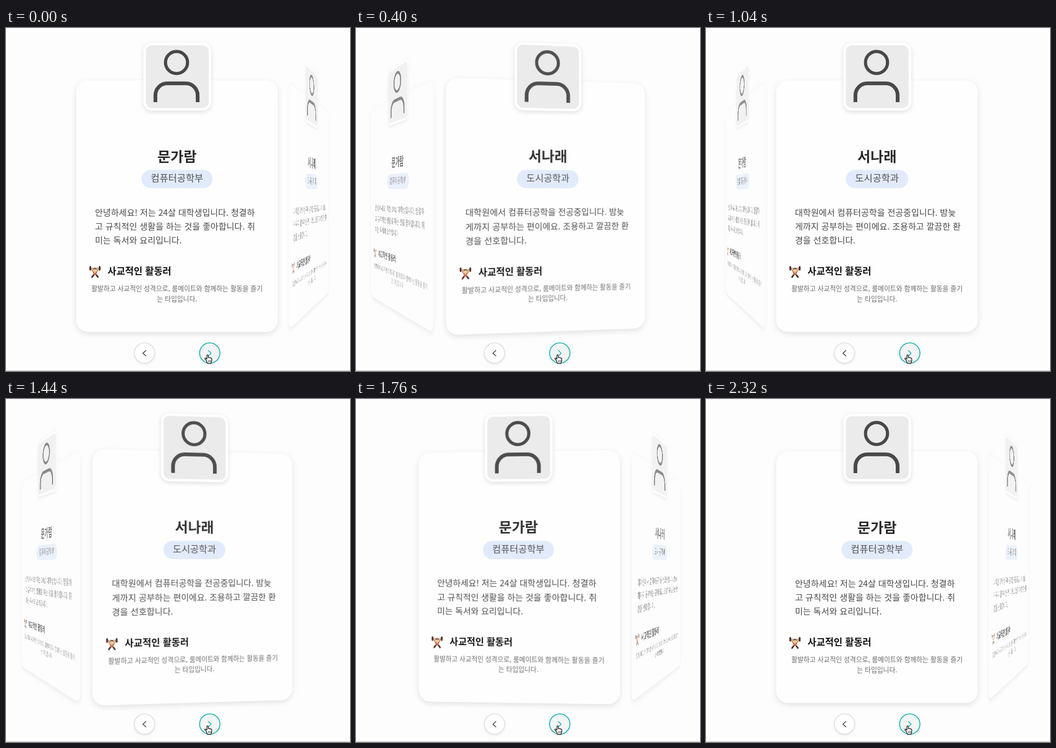
Animation, 696 px wide and 694 px high, one loop 2400 ms. Source, as an HTML page:

```html
<!DOCTYPE html>
<html lang="ko">
<head>
<meta charset="utf-8">
<title>Card carousel</title>
<style>
  html, body { margin: 0; width: 100%; height: 100%; overflow: hidden; background: #fdfdfd; }
  #stage { position: relative; width: 696px; height: 694px; overflow: hidden;
    perspective: 900px; perspective-origin: 346px 336px; }
  svg { position: absolute; left: 0; top: 0; overflow: visible; }
  .card { transform-origin: 346px 336px; }
  text { font-family: "Noto Sans CJK KR", "Noto Sans CJK", "Noto Sans", sans-serif; }
  .mid { text-anchor: middle; }
  .panel { fill: #fefefe; filter: drop-shadow(0 4px 6px rgba(0, 0, 0, .11)); }
  .frame { fill: #fff; filter: drop-shadow(0 3px 5px rgba(0, 0, 0, .12)); }
  .name { font-size: 28.8px; font-weight: 700; fill: #2c2c2c; }
  .major { font-size: 19.2px; fill: #505050; }
  .intro { font-size: 17.5px; fill: #4a4a4a; }
  .trait { font-size: 19.2px; font-weight: 700; fill: #111; }
  .note { font-size: 13.4px; fill: #686868; }
  .line { fill: none; stroke: #484848; stroke-width: 7.5; }
  .button { stroke-width: 1.8; filter: drop-shadow(0 2px 2px rgba(0, 0, 0, .08)); }
  .chevron { fill: none; stroke-width: 1.6; stroke-linecap: round; stroke-linejoin: round; }
</style>
</head>
<body>
<div id="stage"></div>
<script>
const people = [
  { name: '문가람', major: '컴퓨터공학부', intro: [
    '안녕하세요! 저는 24살 대학생입니다. 청결하',
    '고 규칙적인 생활을 하는 것을 좋아합니다. 취',
    '미는 독서와 요리입니다.'] },
  { name: '서나래', major: '도시공학과', intro: [
    '대학원에서 컴퓨터공학을 전공중입니다. 밤늦',
    '게까지 공부하는 편이에요. 조용하고 깔끔한 환',
    '경을 선호합니다.'] }
];
const RADIUS = 382, STEP = 60, DURATION = 560, LOOP = 2400, TICK = 80;

const text = (cls, x, y, str) => `<text class="${cls}" x="${x}" y="${y}">${str}</text>`;

const lifter = `<g transform="translate(168 481)" fill="none" stroke-linecap="round">
  <path d="M3 5H21" stroke="#777" stroke-width="1.2"/>
  <path d="M2.5 2.5V8M21.5 2.5V8" stroke="#4a2522" stroke-width="3.6"/>
  <path d="M5 6L8 12H16L19 6" stroke="#c98d5c" stroke-width="2.6"/>
  <path d="M7.5 11H16.5L15 19H9Z" fill="#e3bd92"/>
  <path d="M9 13L11 17.5H13L15 13" stroke="#b8402f" stroke-width="1.8"/>
  <circle cx="12" cy="8.5" r="3.5" fill="#f0c896"/>
  <path d="M9 7Q12 3.5 15 7" stroke="#5a3a22" stroke-width="1.8"/>
  <path d="M9 19L6 23M15 19L18 23" stroke="#4a2522" stroke-width="3"/>
</g>`;

function card({ name, major, intro }) {
  const pill = major.length * 17.66 + 38;
  return `<svg class="card" width="696" height="694">
    <rect class="panel" x="142" y="106" width="408" height="509" rx="24"/>
    <rect class="frame" x="278" y="30" width="137" height="137" rx="17"/>
    <rect x="283" y="35" width="127" height="127" rx="12" fill="#ebebeb"/>
    <circle class="line" cx="345" cy="69.8" r="22.3" style="stroke-width:6.4"/>
    <path class="line" d="M302.3 150V136a24 24 0 0 1 24-24h37.4a24 24 0 0 1 24 24v14"/>
    ${text('name mid', 346, 270.5, name)}
    <rect x="${346 - pill / 2}" y="287" width="${pill}" height="37" rx="18.5" fill="#e1ebfb"/>
    ${text('major mid', 346, 311, major)}
    ${intro.map((str, i) => text('intro', 180, 379.5 + i * 28.16, str)).join('')}
    ${lifter}
    ${text('trait', 205.5, 499, '사교적인 활동러')}
    ${text('note mid', 346, 532, '활발하고 사교적인 성격으로, 룸메이트와 함께하는 활동을 즐기')}
    ${text('note mid', 346, 552.5, '는 타입입니다.')}
  </svg>`;
}

const controls = `<svg width="696" height="694">
  <circle class="button" cx="280.3" cy="657.7" r="20.5" fill="#fff" stroke="#e0e0e0"/>
  <path class="chevron" d="M283 652.5L277 658L283 663.5" stroke="#333"/>
  <circle class="button" cx="412.3" cy="657.7" r="20.5" fill="#f3f4f4" stroke="#18b2b0"/>
  <path class="chevron" d="M409.5 652.5L415 658L409.5 663.5" stroke="#18b2b0"/>
  <path d="M405.5 673L402.5 669.5Q402 667.5 404.5 668L406.5 670V662.5Q407.8 660 409.2 662.5V667
    Q410.7 665.5 411.8 667.3Q413.3 666.2 414.3 668Q416.2 667.5 416.3 669.5V673L414.8 678.5H407.5Z"
    fill="#fff" stroke="#111" stroke-width="1.3" stroke-linejoin="round"/>
  <path d="M409.5 672V676M411.8 672V676M414 672V676" stroke="#111" stroke-width=".8"/>
  <rect y="693" width="696" height="1" fill="#b8b8b8"/>
</svg>`;

const stage = document.getElementById('stage');
stage.innerHTML = people.map(card).join('') + controls;
const cards = stage.querySelectorAll('.card');

// cubic-bezier(.4, 0, .2, 1)
function ease(x) {
  if (x <= 0) return 0;
  if (x >= 1) return 1;
  let lo = 0, hi = 1, s;
  for (let i = 0; i < 24; i++) {
    s = (lo + hi) / 2;
    const bx = 1.2 * s * (1 - s) ** 2 + .6 * s * s * (1 - s) + s ** 3;
    if (bx < x) lo = s; else hi = s;
  }
  return s * s * (3 - 2 * s);
}

function draw(now) {
  const t = Math.floor(now % LOOP / TICK) * TICK;
  const turn = ease((t - 51) / DURATION) - ease((t - 1345) / DURATION);
  cards.forEach((el, i) => {
    const offset = i - turn;
    el.style.transform =
      `translateZ(${-RADIUS}px) rotateY(${offset * STEP}deg) translateZ(${RADIUS}px)`;
    el.style.opacity = 1 - .4 * Math.abs(offset);
  });
}

const start = performance.now();
function loop() {
  draw(performance.now() - start);
  requestAnimationFrame(loop);
}
loop();
</script>
</body>
</html>
```
